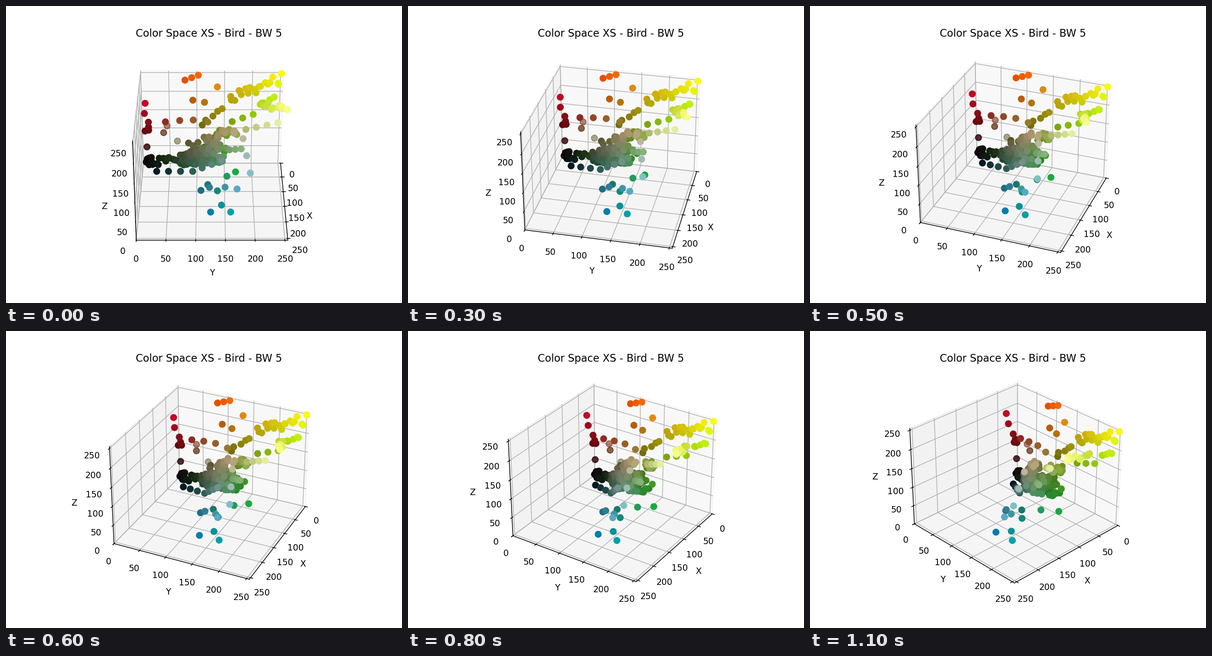
Write a matplotlib script that moves like this. It is 864 px wide and 648 px high and loops after 1.2 s.

```python
import numpy as np
import matplotlib.pyplot as plt
from matplotlib.animation import FuncAnimation

FRAMES, SWEEP = 12, 50
rng = np.random.default_rng(5)


def strand(n, *keys, jitter=0, ease=1):
    """n colours along the line through the keys, loosened by noise."""
    keys = np.array(keys, float)
    t = np.linspace(0, 1, n) ** ease * (len(keys) - 1)
    pts = np.column_stack([np.interp(t, range(len(keys)), k) for k in keys.T])
    return pts + rng.uniform(-1, 1, pts.shape) * jitter


def green_mass(n):
    """Greens whose red part follows the blue part."""
    g = rng.triangular(68, 112, 154, n)
    blue = 0.2 + 0.62 * rng.random(n) ** 1.2
    red = 0.75 * blue + 0.0016 * (g - 30) + rng.uniform(-0.14, 0.29, n)
    return np.column_stack([blue * g, g, red * g])


# Colours are (blue, green, red), which are also x, y, z.
warm = [
    strand(3, (0, 79, 230), (0, 103, 243)),
    strand(3, (10, 93, 183), (14, 114, 180), (18, 137, 224)),
    strand(6, (13, 9, 101), (37, 11, 194), jitter=(2, 4, 2), ease=2),
    strand(4, (33, 45, 144), (47, 120, 152), jitter=3),
    strand(5, (8, 107, 114), (8, 146, 161), jitter=3),
]
cool = [
    strand(3, (174, 125, 5), (155, 144, 8), (168, 160, 0)),
    strand(3, (134, 108, 31), (106, 120, 24), (122, 137, 20)),
    strand(3, (147, 123, 50), (161, 150, 62), (196, 170, 86)),
    strand(2, (92, 154, 36), (63, 170, 25)),
    strand(3, (159, 180, 189), (196, 192, 128)),
    strand(7, (36, 26, 5), (85, 93, 44), (140, 144, 116)),
]
bright = [
    strand(19, (8, 160, 186), (8, 253, 240), jitter=(4, 3, 14)),
    strand(11, (139, 254, 249), (30, 218, 185), jitter=6),
    strand(5, (8, 214, 175), (8, 240, 195), jitter=6),
    strand(3, (12, 164, 126), (8, 202, 143)),
    strand(4, (112, 186, 178), (157, 238, 228)),
]
bulk = [
    strand(3, (107, 158, 120), (122, 178, 134)),
    strand(14, (20, 135, 92), (77, 171, 150), jitter=8),
    strand(16, (50, 92, 95), (120, 164, 177), jitter=8),
    strand(9, (9, 8, 5), (9, 13, 20), jitter=5),
    strand(13, (10, 18, 12), (30, 76, 42), jitter=7),
    green_mass(200),
]
faded = strand(4, (10, 8, 54), (6, 39, 91), (20, 46, 120), (8, 64, 69))

pts = np.vstack(warm + cool + bright + bulk + [faded]).clip(0, 255)
alpha = np.ones(len(pts))
alpha[-len(faded):] = np.linspace(0.85, 0.45, len(faded))
colors = np.column_stack([pts[:, ::-1] / 255, alpha])

fig = plt.figure(figsize=(6.4, 4.8), dpi=135)
ax = fig.add_subplot(projection="3d")
ax.scatter(*pts.T, c=colors, s=50, depthshade=False)
ax.set(xlim=(0, 255), ylim=(0, 255), zlim=(0, 255),
       xlabel="X", ylabel="Y", zlabel="Z",
       title="Color Space XS - Bird - BW 5")


def update(i):
    ax.view_init(elev=30, azim=i * SWEEP / FRAMES)
    return []


anim = FuncAnimation(fig, update, frames=FRAMES, interval=100, repeat=True)
plt.show()
```
